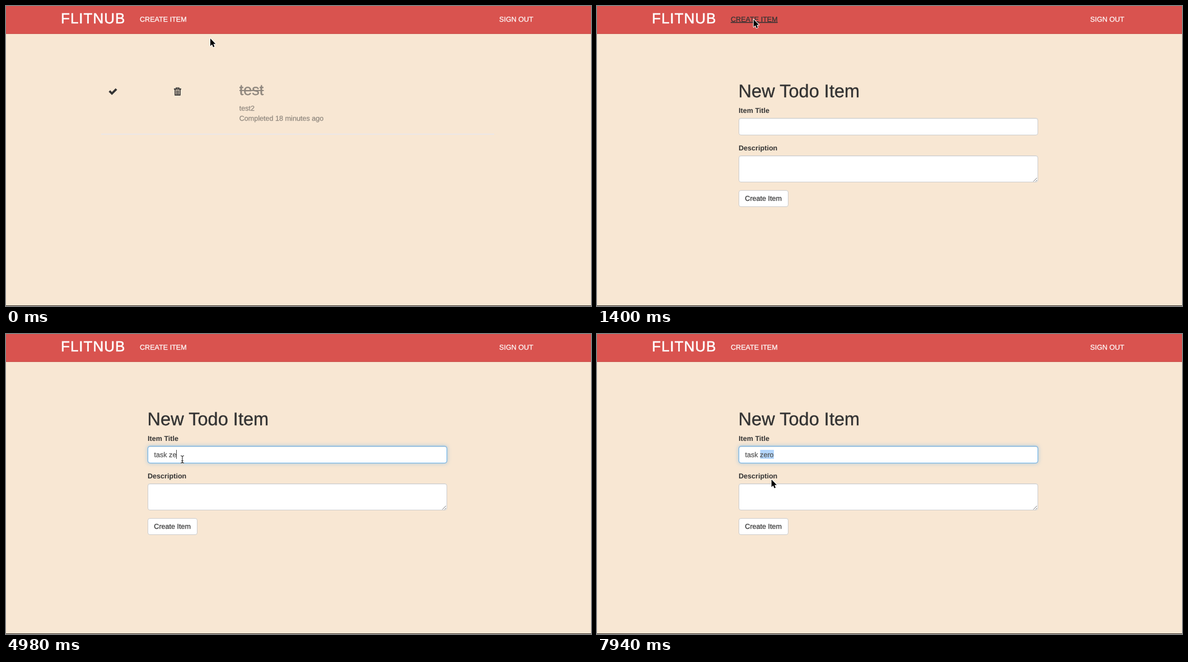
An HTML page that plays this animation: 1045 by 536 pixels, repeating every 8 s.

```html
<!DOCTYPE html>
<html lang="en">
<head>
<meta charset="utf-8">
<title>Todo list</title>
<style>
  html, body { margin: 0; width: 100%; height: 100%; overflow: hidden; }
  body { position: relative; background: #f8e7d3; }
  nav { position: absolute; left: 0; top: 0; width: 100%; height: 49px; background: #d9534f; border-bottom: 1px solid #c9544e; }
  .foot { position: absolute; left: 0; top: 535px; width: 100%; height: 1px; background: #2a2522; }
  .box { position: absolute; left: 253px; width: 535px; box-sizing: border-box; background: #fff; border: 1px solid #ccc; border-radius: 4px; box-shadow: inset 0 1px 1px rgba(0,0,0,.075); }
  .title { top: 200px; height: 31px; }
  .about { top: 267px; height: 48px; }
  .send { top: 329px; height: 30px; width: 89px; box-shadow: none; }
  #focus { background: none; border-color: #66afe9; box-shadow: inset 0 1px 1px rgba(0,0,0,.075), 0 0 7px rgba(102,175,233,.6); }
  svg { position: absolute; left: 0; top: 0; }
  text { font: 12.6px "Liberation Sans", Arial, sans-serif; color: #333; fill: currentColor; stroke: currentColor; stroke-width: .25px; white-space: pre; text-rendering: geometricPrecision; }
  text.nav { color: #fff; }
  text.brand { font-size: 26px; letter-spacing: 1px; stroke-width: .6px; }
  text.hover { color: #333; text-decoration: underline; }
  text.label { font-weight: bold; stroke-width: 0; }
  text.h1 { font-size: 32.6px; stroke-width: .4px; }
  text.h2 { font-size: 27px; stroke-width: .4px; }
  #typed { color: #555; }
  .halo { stroke: #fff; stroke-width: 2.4px; stroke-opacity: .7; }
  .ink { stroke: #222; stroke-width: 1.1px; }
</style>
</head>
<body>
<nav></nav>
<div class="foot"></div>
<div id="fields">
  <div class="box title"></div>
  <div class="box title" id="focus"></div>
  <div class="box about"></div>
  <div class="box send"></div>
</div>
<svg width="1045" height="536" viewBox="0 0 1045 536">
  <defs>
    <path id="ibeam" d="M-3-6.5Q0-6.5 0-4.5V4.5Q0 6.5-3 6.5M3-6.5Q0-6.5 0-4.5V4.5Q0 6.5 3 6.5M-1.8 2.5H1.8"/>
  </defs>
  <text class="nav brand" x="98" y="31.3">FLITNUB</text>
  <text class="nav" id="link" x="239" y="27.8">CREATE ITEM</text>
  <text class="nav" x="881" y="27.8">SIGN OUT</text>

  <g id="list">
    <path fill="#333" d="M183.4 153.3l2.7-2.7 3.1 3.1 6.6-6.7 2.8 2.7-9.4 9.4z"/>
    <g fill="none" stroke="#333">
      <path stroke-width="2" d="M300 148.4h13"/>
      <path stroke-width="1.4" d="M304 148v-1.9h5v1.9"/>
      <path stroke-width="1.7" d="M302.1 149v10.2h8.8V149"/>
      <path stroke-width="1.2" d="M304.6 150.5v8M306.5 150.5v8M308.4 150.5v8"/>
    </g>
    <g opacity=".53">
      <text class="h2" x="416.7" y="159">test</text>
      <rect x="417" y="150" width="43.5" height="2" fill="#333"/>
      <text x="416.7" y="187">test2</text>
      <text x="416.7" y="204.9">Completed 18 minutes ago</text>
    </g>
    <rect x="170" y="228" width="702" height="2" fill="#ece7e7"/>
  </g>

  <g id="form">
    <text class="h1" x="252.5" y="162.6">New Todo Item</text>
    <text class="label" x="253" y="191.2">Item Title</text>
    <rect id="select" x="291.5" y="207" width="24.5" height="16" fill="#b3d6fc"/>
    <text id="typed" x="264.5" y="220"></text>
    <rect id="caret" y="207" width="1" height="16" fill="#444"/>
    <text class="label" x="253" y="257.8">Description</text>
    <path d="M779.5 313.5l6.5-6.5M783.5 313.5l2.5-2.5" stroke="#777" fill="none"/>
    <text x="264.3" y="348.3">Create Item</text>
  </g>

  <path id="arrow" d="M0 0V13.4L3 10.6 5.1 15.4 7.4 14.4 5.4 9.7H9.4Z" stroke="#fff" stroke-width="2" stroke-linejoin="round" paint-order="stroke"/>
  <g id="beam" fill="none">
    <use href="#ibeam" class="halo"/>
    <use href="#ibeam" class="ink"/>
  </g>
</svg>
<script>
const LOOP = 8000, STEP = 60, BLINK = 480;
const HOVER = 930, OPEN = 1400, FOCUS = 2120, SELECT = 7340;
const TEXT = 'task zero', TEXT_X = 264.5;

// The pointer rests between moves
const moves = [
  { from: 60, to: 630, x: 279.8, y: 24 },
  { from: 1460, to: 2070, x: 315, y: 224 },
  { from: 6060, to: 6400, x: 328, y: 318 },
  { from: 6450, to: 6800, x: 311, y: 217 },
  { from: 7820, to: 7940, x: 311.7, y: 260 }
];

// Typing comes in bursts at an even pace
const bursts = [
  { at: 2780, pace: 150, letters: 3 },
  { at: 3610, pace: 0, letters: 1 },
  { at: 4560, pace: 195, letters: 5 }
];
const keyTimes = bursts.flatMap(b =>
  Array.from({ length: b.letters }, (_, i) => b.at + i * b.pace));

const $ = id => document.getElementById(id);
const show = (id, on) => { $(id).style.display = on ? '' : 'none'; };
const clamp = v => Math.max(0, Math.min(1, v));
const ease = u => u * u * (3 - 2 * u);

function pointer(t) {
  let x = 365, y = 58;
  for (const m of moves) {
    if (t < m.from) break;
    const passed = (Math.floor((t - m.from) / STEP) + 1) * STEP;
    const e = ease(clamp(passed / (m.to - m.from + STEP)));
    x += (m.x - x) * e;
    y += (m.y - y) * e;
  }
  return [x, y];
}

function drawPointer(t, form) {
  const [x, y] = pointer(t);
  const beam = form && ((y > 200 && y < 231) || (y > 267 && y < 315));
  show('arrow', !beam);
  show('beam', beam);
  $(beam ? 'beam' : 'arrow').setAttribute('transform', `translate(${x} ${y})`);
  $('link').classList.toggle('hover', t >= HOVER && y < 36);
}

function drawField(t) {
  const typed = $('typed');
  const pressed = keyTimes.filter(k => k <= t);
  typed.textContent = TEXT.slice(0, pressed.length);

  // The caret starts a fresh blink at each key
  const idle = t - (pressed.at(-1) ?? FOCUS);
  const lit = idle >= 0 && t < SELECT && Math.floor(idle / BLINK) % 2 === 0;
  show('caret', lit);
  if (lit) $('caret').setAttribute('x', Math.round(TEXT_X + typed.getComputedTextLength() - 0.5));

  $('focus').style.opacity = clamp((t - FOCUS + STEP) / (3 * STEP));
  show('select', t >= SELECT);
}

function draw(t) {
  const form = t >= OPEN;
  show('list', !form);
  show('form', form);
  show('fields', form);
  drawPointer(t, form);
  drawField(t);
}

let start;
function tick(now) {
  start ??= now;
  draw((now - start) % LOOP);
  requestAnimationFrame(tick);
}
draw(0);
requestAnimationFrame(tick);
</script>
</body>
</html>
```
